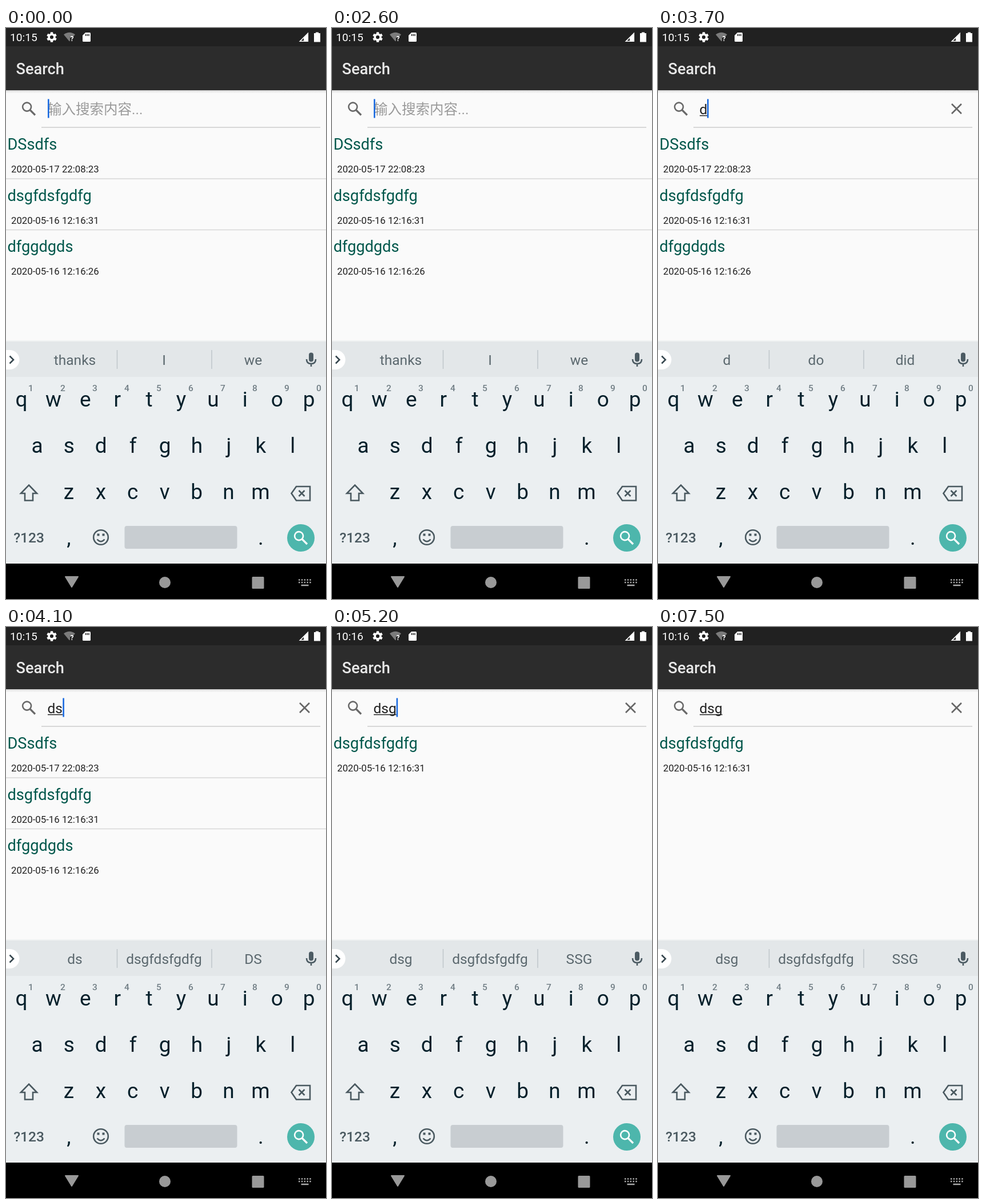
Recreate the animation shown at these times as an HTML page. Size 560 by 1000 pixels, loop 8 s.

```html
<!DOCTYPE html>
<html lang="en">
<head>
<meta charset="utf-8">
<title>Search</title>
<style>
html, body { margin: 0; width: 560px; height: 1000px; overflow: hidden; background: #fafafa; }
svg { display: block; font-family: Roboto, "Noto Sans CJK SC", "Noto Sans CJK", sans-serif; }
.line { fill: none; stroke-width: 2.6; }
.mid { text-anchor: middle; }
.name { font-size: 27.2px; fill: #00574b; }
.date { font-size: 16.8px; fill: #212121; }
.key { font-size: 37px; fill: #06202b; }
.num { font-size: 15.5px; font-weight: 500; fill: #717e85; }
.tip { font-size: 24.5px; fill: #5b686e; }
</style>
</head>
<body>
<svg width="560" height="1000" viewBox="0 0 560 1000">
  <defs>
    <linearGradient id="shade" x2="0" y2="1">
      <stop stop-color="#d8d8d8"/><stop offset="1" stop-color="#fafafa"/>
    </linearGradient>
    <g id="lens" class="line">
      <circle cx="-3.4" cy="-3.4" r="7.5"/><path d="M2 2L11 11" stroke-width="3.2"/>
    </g>
  </defs>

  <!-- status bar -->
  <rect width="560" height="33" fill="#212121"/>
  <text id="clock" x="7" y="23" font-size="19.2" fill="#fff"></text>
  <g stroke="#fff" fill="none">
    <circle cx="80" cy="16" r="4.9" stroke-width="3.6"/>
    <path id="teeth" stroke-width="4.4"/>
  </g>
  <path d="M101 11.500Q111 4 121 11.500L117 16H112V22L111 23.500Z" fill="#7b7b7b"/>
  <text x="112.500" y="23" font-size="12" font-weight="700" fill="#fff">?</text>
  <path d="M139 8H146.500Q148 8 148 9.500V22.500Q148 24 146.500 24H135.500Q134 24 134 22.500V13Z" fill="#fff"/>
  <path d="M139.500 10.500V14M142.300 10.500V14M145 10.500V14" stroke="#212121" stroke-width="1.500"/>
  <path d="M514.500 23.200H528.300V9.500Z" fill="none" stroke="#fff" stroke-width="1.600"/>
  <path d="M521 17L529 9V24H521Z" fill="#fff"/>
  <path d="M542 7.500H547V9H550V24.500H539V9H542Z" fill="#fff"/>

  <!-- title and search field -->
  <rect y="32" width="560" height="77" fill="#2c2c2c"/>
  <text x="17.500" y="81" font-size="27.2" font-weight="500" fill="#e8e8e8">Search</text>
  <rect y="109" width="560" height="5" fill="url(#shade)"/>
  <use href="#lens" x="40" y="141.500" stroke="#6a6a6a"/>
  <path d="M62 174H550" stroke="#cbcbcb" stroke-width="1.500"/>
  <text id="hint" x="73" y="151" font-size="24.5" fill="#9a9a9a">输入搜索内容...</text>
  <text id="query" x="72.500" y="151" font-size="24.5" fill="#212121"></text>
  <path id="under" stroke="#212121" stroke-width="1.500"/>
  <rect id="caret" y="124.500" width="2.600" height="33" fill="#1a6ae0"/>
  <path id="clear" class="line" d="M514 133L531 150M531 133L514 150" stroke="#666"/>
  <g id="list"></g>

  <!-- suggestions -->
  <rect y="547" width="560" height="3" fill="#f0f2f3"/>
  <rect y="549" width="560" height="62" fill="#e3e7e9"/>
  <rect x="-20" y="564" width="43.500" height="34" rx="17" fill="#fff"/>
  <path class="line" d="M6.500 574.500L13 581L6.500 587.500" stroke="#37474f"/>
  <path d="M194.500 564V597M360 564V597" stroke="#c0c6ca" stroke-width="1.500"/>
  <g id="tips"></g>
  <rect x="530" y="568.500" width="8" height="16" rx="4" fill="#4c5b63"/>
  <path class="line" d="M526 580Q526 588 534 588T542 580M534 588V593" stroke="#4c5b63"/>

  <!-- keyboard -->
  <rect y="611" width="560" height="327" fill="#ebeff1"/>
  <g id="keys"></g>
  <g class="line" stroke="#4a5960">
    <path d="M40 800.500L54 815H47V827.500H33V815H26Z"/>
    <path d="M508 803H532V827.500H508L499.500 815Z"/>
    <path d="M512.500 810L522.500 820M522.500 810L512.500 820"/>
    <circle cx="166" cy="892" r="12.800"/>
    <path d="M159.500 895.500Q166 903 172.500 895.500"/>
  </g>
  <path d="M161.500 885.500V889.500M170.500 885.500V889.500" stroke="#4a5960" stroke-width="4"/>
  <text class="mid" x="40" y="901" font-size="24.5" font-weight="500" fill="#4a5960">?123</text>
  <rect x="207.500" y="872" width="197" height="40" rx="4" fill="#c8cdd1"/>
  <circle cx="516" cy="893" r="24" fill="#4db6ac"/>
  <use href="#lens" x="516" y="893" stroke="#fff"/>

  <!-- navigation bar -->
  <rect y="938" width="560" height="62"/>
  <g fill="#999">
    <path d="M104 961H126L115 979Z" stroke="#999" stroke-width="2" stroke-linejoin="round"/>
    <circle cx="278" cy="971" r="10"/>
    <rect x="430.500" y="961" width="21" height="21" rx="1.500"/>
  </g>
  <path d="M512 966.500H534M512 971H534" stroke="#aaa" stroke-width="2.500" stroke-dasharray="2.5 2.3"/>
  <path d="M516.500 976H529.500" stroke="#aaa" stroke-width="2.500"/>
</svg>
<script>
const $ = id => document.getElementById(id);
const label = (cls, x, y, text) => `<text class="${cls}" x="${x}" y="${y}">${text}</text>`;

const entries = [
  ["DSsdfs", "2020-05-17 22:08:23"],
  ["dsgfdsfgdfg", "2020-05-16 12:16:31"],
  ["dfggdgds", "2020-05-16 12:16:26"]
];
// start time, query, caret position, suggestions, visible entries
const stages = [
  [0, "", 73, ["thanks", "I", "we"], entries],
  [3700, "d", 86, ["d", "do", "did"], entries],
  [4100, "ds", 99.3, ["ds", "dsgfdsfgdfg", "DS"], entries],
  [5200, "dsg", 112.6, ["dsg", "dsgfdsfgdfg", "SSG"], [entries[1]]]
];
const blinks = [300, 800, 1200, 1700, 2100, 2600, 3200, 3500,
  4600, 5000, 5700, 6200, 6600, 7100, 7500];

$("teeth").setAttribute("d", [...Array(6)].map((_, i) => {
  const a = i * Math.PI / 3 + Math.PI / 6, c = Math.cos(a), s = Math.sin(a);
  return `M${80 + 5 * c} ${16 + 5 * s}L${80 + 8.8 * c} ${16 + 8.8 * s}`;
}).join(""));

const row = (letters, x, y) =>
  [...letters].map((c, i) => label("key mid", x + 55.9 * i, y, c)).join("");
$("keys").innerHTML = row("qwertyuiop", 27, 663) + row("asdfghjkl", 54.5, 744) +
  row("zxcvbnm", 110, 825) + row(",", 110, 905) + row(".", 446, 905) +
  [..."1234567890"].map((c, i) => label("num mid", 43.5 + 56 * i, 636, c)).join("");

let shown;
function show(stage) {
  const [, query, caret, tips, items] = shown = stage;
  $("query").textContent = query;
  $("hint").style.display = query ? "none" : "";
  $("clear").style.display = query ? "" : "none";
  $("under").setAttribute("d", query ? `M73 ${153.5}H${caret}` : "");
  $("caret").setAttribute("x", caret);
  $("tips").innerHTML = tips.map((t, i) => label("tip mid", [120.5, 276.5, 432.5][i], 590, t)).join("");
  $("list").innerHTML = items.map(([name, date], i) => {
    const y = 89.5 * i;
    const rule = i ? `<path d="M0 ${174.5 + y}H560" stroke="#d6d6d6" stroke-width="1.5"/>` : "";
    return rule + label("name", 2.5, 213 + y, name) + label("date", 9, 253 + y, date);
  }).join("");
}

function draw() {
  const t = performance.now() % 8000;
  const stage = stages.findLast(s => s[0] <= t);
  if (stage !== shown) show(stage);
  $("clock").textContent = t < 4400 ? "10:15" : "10:16";
  $("caret").style.display = blinks.filter(b => b <= t).length % 2 ? "none" : "";
  requestAnimationFrame(draw);
}
draw();
</script>
</body>
</html>
```
